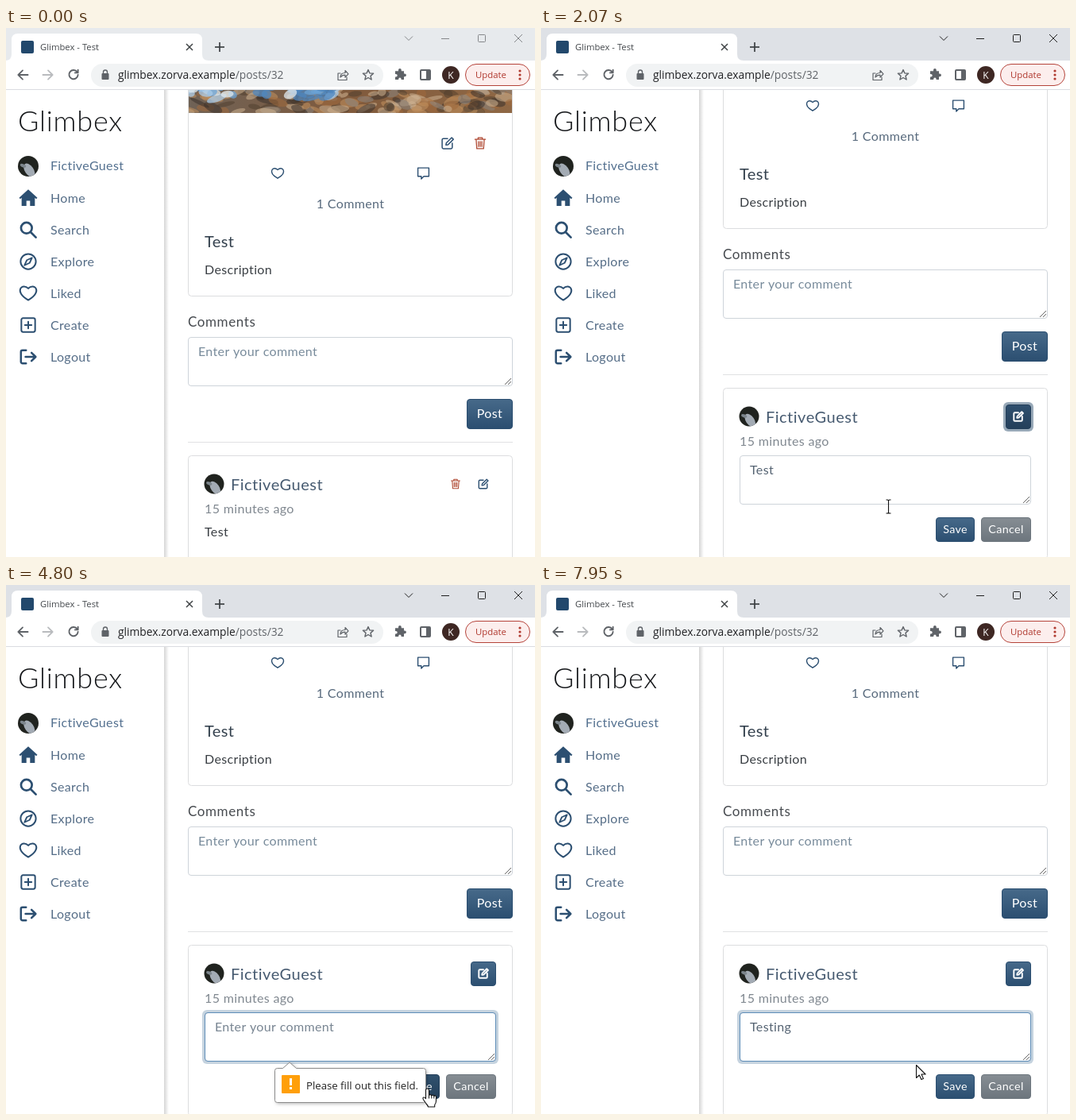
An HTML page with a canvas for the animation above (8 s loop, 666 px wide and 666 px high).

```html
<!DOCTYPE html>
<html lang="en">
<head>
<meta charset="utf-8">
<title>Comment editing</title>
<style>
  html, body { margin: 0; width: 100%; height: 100%; overflow: hidden; background: #fff; }
  canvas { display: block; width: 666px; height: 666px; }
</style>
</head>
<body>
<canvas id="stage"></canvas>
<script>
const SIZE = 666, LOOP = 8000;
const canvas = document.getElementById('stage');
const ctx = canvas.getContext('2d');
const dpr = window.devicePixelRatio || 1;
canvas.width = canvas.height = SIZE * dpr;

const BODY = 'Lato, sans-serif';
const UI = '"Open Sans", sans-serif';
const NAVY = '#2c4f71', RED = '#b04a34', GREY = '#5f6368';
const BRAND = 'Glimbex', USER = 'FictiveGuest';

// Icons on a 16 x 16 grid
const ICON = {
  heart: 'M8 14.2C-6 6 3-2 8 3.6C13-2 22 6 8 14.2z',
  edit: 'M8 2.5H3A1.5 1.5 0 0 0 1.5 4v9A1.5 1.5 0 0 0 3 14.5h9a1.5 1.5 0 0 0 1.5-1.5V8M6 10.2l.4-2.4 6.4-6.4 2 2-6.4 6.4z',
  trash: 'M1.8 3.5h12.4M5.5 3.5v-2h5v2M3.2 3.5l.8 11h8l.8-11M6 6v6M8 6v6M10 6v6',
  chat: 'M1.5 1.5h13v10H8.5l-3 3v-3h-4z',
  house: 'M8 .6L0 7.8l1 1.1 1.2-1V15h4.2v-4.6h3.2V15h4.2V7.9l1.2 1 1-1.1z',
  search: 'M11.4 6.4a5 5 0 1 1-10 0a5 5 0 0 1 10 0zM10.2 10.2l4.8 4.8',
  ring: 'M15 8a7 7 0 1 1-14 0a7 7 0 0 1 14 0z',
  needle: 'M11.8 4.2L9.4 9.4 4.2 11.8 6.6 6.6z',
  plus: 'M3 1.4h10A1.6 1.6 0 0 1 14.6 3v10a1.6 1.6 0 0 1-1.6 1.6H3A1.6 1.6 0 0 1 1.4 13V3A1.6 1.6 0 0 1 3 1.4zM8 4.8v6.4M4.8 8h6.4',
  logout: 'M6 2H2.8A1.5 1.5 0 0 0 1.3 3.5v9A1.5 1.5 0 0 0 2.8 14H6M5.5 8h9M11 4.2L14.8 8 11 11.8',
  back: 'M15 8H2M8 2L2 8l6 6',
  reload: 'M13 4.2A6 6 0 1 0 14 8M14 1.2v4h-4',
  share: 'M5 6H2v8.5h11V11M5 11c0-4 3-5.5 6-5.5V2.5L15 6.8 11 11V8.2C8.5 8.2 6.5 9 5 11z',
  star: 'M8 1.6l1.9 4.3 4.7.4-3.6 3.1 1.1 4.6L8 11.5 3.9 14 5 9.4 1.4 6.3l4.7-.4z',
  puzzle: 'M6 2a1.9 1.9 0 0 1 3.8 0v1.2H13v3.2h1a1.9 1.9 0 0 1 0 3.8h-1V14H9.6v-.8a1.7 1.7 0 0 0-3.4 0v.8H2v-3.6h1A1.7 1.7 0 0 0 3 7H2V3.2h4z'
};
const CURSOR = {
  arrow: 'M0 0V16L3.8 12.5 6.3 18 8.9 16.9 6.5 11.5H11.6z',
  hand: 'M-2 1.5a2 2 0 0 1 4 0V8a1.8 1.8 0 0 1 3.3.4a1.7 1.7 0 0 1 3 .6a1.5 1.5 0 0 1 2.7.8V15q0 3-1.8 5v2.5H1q-.5-2-2.5-4L-5 13.5q-1.4-2.6.5-3q1.2-.2 2.5 1.6z',
  beam: 'M-3-8.5H-1.5Q0-8.5 0-7.5Q0-8.5 1.5-8.5H3M0-7.5V7.5M-3 8.5H-1.5Q0 8.5 0 7.5Q0 8.5 1.5 8.5H3'
};

// time, x, y, pointer shape
const PATH = [
  [130, 605, 662, 'arrow'], [400, 601, 582, 'hand'], [460, 601, 574, 'hand'],
  [860, 601, 574, 'hand'], [1000, 568, 586, 'arrow'], [1400, 450, 619, 'arrow'],
  [1870, 450, 619, 'beam'], [2330, 421, 581, 'beam'], [3220, 421, 581, 'beam'],
  [3480, 475, 607, 'arrow'], [3640, 512, 626, 'hand'], [3770, 530, 634, 'hand'],
  [4800, 530, 634, 'hand'], [4930, 505, 615, 'arrow'], [5060, 470, 597, 'beam'],
  [5440, 421, 565, 'beam'], [7770, 421, 565, 'beam'], [7860, 446, 583, 'arrow'],
  [7940, 472, 604, 'arrow']
];
const CLICKS = [730, 2400, 2620, 3970];
const KEYS = [6010, 6220, 6480, 6680, 6880, 7020, 7280];
const CARET = [[2400, 2620], [3220, 3740], [4240, 4740], [5240, 5740], [6010, 7810]];

const ramp = (t, a, b) => Math.min(1, Math.max(0, (t - a) / (b - a)));
const ease = k => k * k * (3 - 2 * k);
const between = (t, a, b) => t >= a && t < b;

function text(s, x, y, size, color, { font = BODY, weight = 400, align = 'left', gap = 0.35 } = {}) {
  ctx.font = `${weight} ${size}px ${font}`;
  ctx.letterSpacing = (font === BODY ? gap : 0) + 'px';
  ctx.textAlign = align;
  ctx.fillStyle = color;
  ctx.fillText(s, x, y);
  return ctx.measureText(s).width;
}

function icon(name, x, y, size, color, width = 1.3, fill = false) {
  const k = size / 16, p = new Path2D(ICON[name]);
  ctx.save();
  ctx.translate(x - size / 2, y - size / 2);
  ctx.scale(k, k);
  ctx.lineJoin = ctx.lineCap = 'round';
  ctx.lineWidth = width / k;
  ctx.strokeStyle = ctx.fillStyle = color;
  if (fill) ctx.fill(p); else ctx.stroke(p);
  ctx.restore();
}

function box(x, y, w, h, r, fill, stroke, lw = 1) {
  ctx.beginPath();
  ctx.roundRect(x, y, w, h, r);
  if (fill) { ctx.fillStyle = fill; ctx.fill(); }
  if (stroke) { ctx.strokeStyle = stroke; ctx.lineWidth = lw; ctx.stroke(); }
}

function oval(x, y, rx, ry, turn, fill) {
  ctx.beginPath();
  ctx.ellipse(x, y, rx, ry, turn, 0, 7);
  ctx.fillStyle = fill;
  ctx.fill();
}

const disc = (x, y, r, fill) => oval(x, y, r, r, 0, fill);

function line(color, lw, ...pts) {
  ctx.beginPath();
  for (let i = 0; i < pts.length; i += 2) ctx.lineTo(pts[i], pts[i + 1]);
  ctx.strokeStyle = color;
  ctx.lineWidth = lw;
  ctx.lineCap = 'butt';
  ctx.stroke();
}

function button(x, y, w, h, top, bottom) {
  const g = ctx.createLinearGradient(0, y, 0, y + h);
  g.addColorStop(0, top);
  g.addColorStop(1, bottom);
  box(x + .5, y + .5, w - 1, h - 1, 3.5, g, bottom);
}

function avatar(x, y, r) {
  ctx.save();
  disc(x, y, r, '#20231f');
  ctx.clip();
  oval(x + r * .1, y + r * .4, r * .42, r * .75, -.6, '#a3abb4');
  oval(x - r * .5, y - r * .05, r * .3, r * .16, .4, '#7c858c');
  ctx.restore();
}

function textarea(x, y, w, focus = 0) {
  if (focus > 0) {
    ctx.globalAlpha = focus;
    box(x - 3, y - 3, w + 6, 68, 6, '#c5d3df');
    ctx.globalAlpha = 1;
  }
  box(x + .5, y + .5, w - 1, 61, 3.5, '#fff', '#ced4da');
  if (focus > 0) {
    ctx.globalAlpha = focus;
    box(x + .5, y + .5, w - 1, 61, 3.5, null, '#5e8db8');
    ctx.globalAlpha = 1;
  }
  const r = x + w - 2, b = y + 60;
  line('#666', 1, r - 8, b, r, b - 8);
  line('#666', 1, r - 4, b, r, b - 4);
}

// Pebbles with water lying over the upper left
function shore(y, h) {
  let seed = 7;
  const rnd = () => (seed = seed * 16807 % 2147483647) / 2147483647;
  const scatter = (n, x, w, top, depth, tones) => {
    for (let i = 0; i < n; i++) {
      oval(x + rnd() * w, y + top + rnd() * depth, 5 + rnd() * 9, 2.5 + rnd() * 3.5,
        rnd() - .5, tones[rnd() * tones.length | 0]);
    }
  };
  ctx.save();
  ctx.beginPath();
  ctx.rect(230, y, 407, h);
  ctx.clip();
  const g = ctx.createLinearGradient(230, 0, 637, 0);
  g.addColorStop(0, '#6f6256');
  g.addColorStop(.5, '#805a3c');
  g.addColorStop(1, '#8f6845');
  ctx.fillStyle = g;
  ctx.fillRect(230, y, 407, h);
  ctx.globalAlpha = .55;
  scatter(130, 230, 407, 18, h - 18, ['#a06a3c', '#c2915f', '#51402f', '#cdb291', '#3a322c', '#8a8580']);
  ctx.globalAlpha = .75;
  scatter(34, 230, 190, 14, 15, ['#6ba3d6', '#a9cbe8', '#4d86bd', '#dfe8ee']);
  ctx.restore();
}

function chrome(t) {
  const active = t >= 730;
  const ink = active ? '#1f1f1f' : '#85878a';
  ctx.fillStyle = active ? '#dee1e6' : '#e7eaed';
  ctx.fillRect(0, 0, SIZE, 41);
  ctx.fillStyle = '#fff';
  ctx.fillRect(0, 41, SIZE, 36);
  ctx.fill(new Path2D('M-1 41Q7 41 7 33V15Q7 7 15 7H239Q247 7 247 15V33Q247 41 255 41z'));
  line('#dadce0', 1, 0, 77.5, SIZE, 77.5);
  box(19, 16, 16, 16, 2, '#22486c');
  text(BRAND + ' - Test', 43, 28, 11.3, '#45494d', { font: UI });
  line('#3c4043', 1.5, 227, 20, 235, 28);
  line('#3c4043', 1.5, 235, 20, 227, 28);
  line('#3c4043', 1.7, 263, 24, 275, 24);
  line('#3c4043', 1.7, 269, 18, 269, 30);
  line(ink, 1, 502, 10.5, 507, 15.5, 512, 10.5);
  line(ink, 1, 548, 13.5, 558, 13.5);
  box(594.5, 8.5, 9, 9, 1, null, ink);
  line(ink, 1, 640, 8, 650, 18);
  line(ink, 1, 650, 8, 640, 18);

  icon('back', 21, 59, 15, GREY, 1.8);
  ctx.save();
  ctx.translate(53, 59);
  ctx.scale(-1, 1);
  icon('back', 0, 0, 15, '#b9bbbe', 1.8);
  ctx.restore();
  icon('reload', 85, 59, 15, GREY, 1.9);
  box(107, 45, 368, 29, 14.5, '#f1f3f4');
  box(120.5, 57, 9, 8, 1, GREY);
  box(122.5, 53, 5, 7, 2.5, null, GREY, 1.4);
  const w = text('glimbex.zorva.example', 141, 64, 13.8, '#202124', { font: UI });
  text('/posts/32', 141 + w, 64, 13.8, GREY, { font: UI });
  icon('share', 424, 59, 16, GREY, 1.2);
  icon('star', 456, 59, 16, GREY, 1.4);
  icon('puzzle', 496, 59, 16, GREY, 1, true);
  box(522, 53, 12, 12, 1, null, GREY, 2);
  ctx.fillStyle = GREY;
  ctx.fillRect(529, 53, 5, 12);
  disc(560, 59, 11, '#3e2723');
  text('K', 560, 63.5, 12, '#fff', { font: UI, align: 'center' });
  box(578.5, 45.5, 81, 27, 13.5, '#fceeed', '#b5433a');
  text('Update', 591, 63, 11.4, '#b0392f', { font: UI });
  for (const y of [54, 59, 64]) disc(647, y, 1.6, '#b0392f');
}

function sidebar() {
  ctx.fillStyle = '#fff';
  ctx.fillRect(0, 78, 200, SIZE);
  const g = ctx.createLinearGradient(199, 0, 205, 0);
  g.addColorStop(0, '#d6d6d6');
  g.addColorStop(1, '#ffffff');
  ctx.fillStyle = g;
  ctx.fillRect(199, 78, 6, SIZE);
  text(BRAND, 15, 130, 36, '#15171a', { weight: 300, gap: .8 });
  avatar(28, 174, 13);
  text(USER, 56, 179, 16, '#53708f');
  ['Home', 'Search', 'Explore', 'Liked', 'Create', 'Logout']
    .forEach((s, i) => text(s, 56, 220 + 40 * i, 16, '#556d87'));
  icon('house', 28, 214, 23, NAVY, 1, true);
  icon('search', 28, 254, 22, NAVY, 2.7);
  icon('ring', 28, 294, 22, NAVY, 2);
  icon('needle', 28, 294, 20, NAVY, 1.8);
  icon('heart', 28, 334, 22, NAVY, 2);
  icon('plus', 28, 374, 21, NAVY, 2);
  icon('logout', 28, 414, 22, NAVY, 2.5);
}

function post() {
  box(229.5, 0.5, 408, 337, 4, '#fff', '#dcdddf');
  shore(60, 47);
  icon('edit', 556, 145, 17, NAVY, 1.5);
  icon('trash', 597, 145, 17, RED);
  icon('heart', 342, 183, 16, NAVY, 1.4);
  icon('chat', 525.5, 183, 17, NAVY, 1.4);
  text('1 Comment', 433.5, 227, 16, '#586a7d', { align: 'center' });
  text('Test', 250, 276, 20, '#33404d');
  text('Description', 250, 310, 16, '#3a3f44');
  text('Comments', 229, 376, 17, '#474b50', { gap: .6 });
  textarea(229, 389, 409);
  text('Enter your comment', 242, 413, 16, '#788b9b');
  button(580, 467, 58, 38, '#476a8a', '#2b4e70');
  text('Post', 609, 491, 16, '#fff', { align: 'center' });
  line('#e0e1e3', 1, 229, 521.5, 638, 521.5);
}

function editor(t) {
  const fresh = t < 2400;
  if (fresh) box(582, 556, 38, 37, 6, '#98a9b8');
  button(585, 559, 32, 31, fresh ? '#2f506f' : '#476a8a', fresh ? '#243f5a' : '#2b4e70');
  icon('edit', 601, 574, 14, '#fff', 1.9);

  const focus = ramp(t, 2350, 2470) - ramp(t, 4040, 4170) + ramp(t, 4200, 4330);
  textarea(250, 623, 367, focus);
  const typed = t < 3220 ? 'Test' : 'Testing'.slice(0, KEYS.filter(k => t >= k).length);
  const selected = between(t, 2620, 3220);
  if (selected) {
    ctx.fillStyle = '#a9def4';
    ctx.fillRect(263, 630, 30, 24);
  }
  let width = 0;
  if (typed) width = text(typed, 263, 647, 16, selected ? '#fff' : '#566473') - 1;
  else text('Enter your comment', 263, 647, 16, '#788592');
  if (CARET.some(([a, b]) => between(t, a, b))) {
    ctx.fillStyle = '#222';
    ctx.fillRect(263 + Math.round(width), 632, 1, 19);
  }

  const pressed = between(t, 3970, 4040), hover = between(t, 3640, 4900);
  button(497, 701, 49, 31, pressed ? '#24435f' : hover ? '#31526f' : '#476a8a',
    pressed ? '#193450' : hover ? '#243f5a' : '#2b4e70');
  text('Save', 521.5, 721, 14.3, '#fff', { align: 'center' });
  button(554, 701, 63, 31, '#878e94', '#6c757d');
  text('Cancel', 585.5, 721, 14.3, '#fff', { align: 'center' });
}

function comment(t) {
  box(229.5, 538.5, 408, t < 800 ? 140 : 215, 4, '#fff', '#dcdddf');
  avatar(262, 574, 12.5);
  text(USER, 283, 582, 20, '#465a70', { gap: .5 });
  text('15 minutes ago', 250, 611, 16, '#808890');
  if (t < 800) {
    text('Test', 250, 640, 16, '#3a3f44');
    icon('trash', 566, 574, 14, RED, 1.1);
    icon('edit', 601, 574, 14, NAVY, 1.4);
  } else editor(t);
}

function bubble(t) {
  const alpha = ramp(t, 4240, 4400) - ramp(t, 6010, 6220);
  if (alpha <= 0) return;
  ctx.save();
  ctx.globalAlpha = alpha;
  const p = new Path2D('M341.5 608.5H348.5L357 601L365.5 608.5H525.5Q528.5 608.5 528.5 611.5V648.5Q528.5 651.5 525.5 651.5H341.5Q338.5 651.5 338.5 648.5V611.5Q338.5 608.5 341.5 608.5z');
  ctx.save();
  ctx.shadowColor = 'rgba(0,0,0,.3)';
  ctx.shadowBlur = 4 * dpr;
  ctx.shadowOffsetX = ctx.shadowOffsetY = 1.5 * dpr;
  ctx.fillStyle = '#fff';
  ctx.fill(p);
  ctx.restore();
  ctx.lineWidth = 1;
  ctx.strokeStyle = '#8c8c8c';
  ctx.stroke(p);
  box(347, 617, 23, 23, 1, '#ff9f0a');
  ctx.fillStyle = '#fff';
  ctx.fillRect(357, 621, 3, 9);
  ctx.fillRect(357, 632, 3, 3);
  text('Please fill out this field.', 378, 635, 13.2, '#222', { font: UI });
  ctx.restore();
}

function pointer(t) {
  if (t < PATH[0][0]) return;
  let i = PATH.length - 1;
  while (t < PATH[i][0]) i--;
  const [t0, x0, y0, kind] = PATH[i];
  const [t1, x1, y1] = PATH[Math.min(i + 1, PATH.length - 1)];
  const k = t1 > t0 ? ramp(t, t0, t1) : 0;
  const x = x0 + (x1 - x0) * k, y = y0 + (y1 - y0) * k;
  if (CLICKS.some(c => between(t, c, c + 68))) disc(x, y - 1, 11.5, 'rgba(205,200,30,.7)');
  const p = new Path2D(CURSOR[kind]);
  ctx.save();
  ctx.translate(Math.round(x) + .5, Math.round(y) + .5);
  ctx.lineJoin = 'round';
  ctx.lineWidth = 1.1;
  ctx.strokeStyle = '#111';
  ctx.fillStyle = '#fff';
  if (kind !== 'beam') ctx.fill(p);
  ctx.stroke(p);
  if (kind === 'hand') {
    line('#111', 1, 2, 8, 2, 12);
    line('#111', 1, 5.3, 8.5, 5.3, 12);
    line('#111', 1, 8.3, 9, 8.3, 12);
  }
  ctx.restore();
}

function draw(t) {
  ctx.setTransform(dpr, 0, 0, dpr, 0, 0);
  ctx.fillStyle = '#fff';
  ctx.fillRect(0, 0, SIZE, SIZE);
  ctx.save();
  ctx.beginPath();
  ctx.rect(205, 78, 461, 588);
  ctx.clip();
  ctx.translate(0, -Math.round(85 * ease(ramp(t, 1660, 1800))));
  post();
  comment(t);
  ctx.restore();
  sidebar();
  chrome(t);
  bubble(t);
  pointer(t);
}

const start = performance.now();
function tick() {
  draw((performance.now() - start) % LOOP);
  requestAnimationFrame(tick);
}
tick();
</script>
</body>
</html>
```
